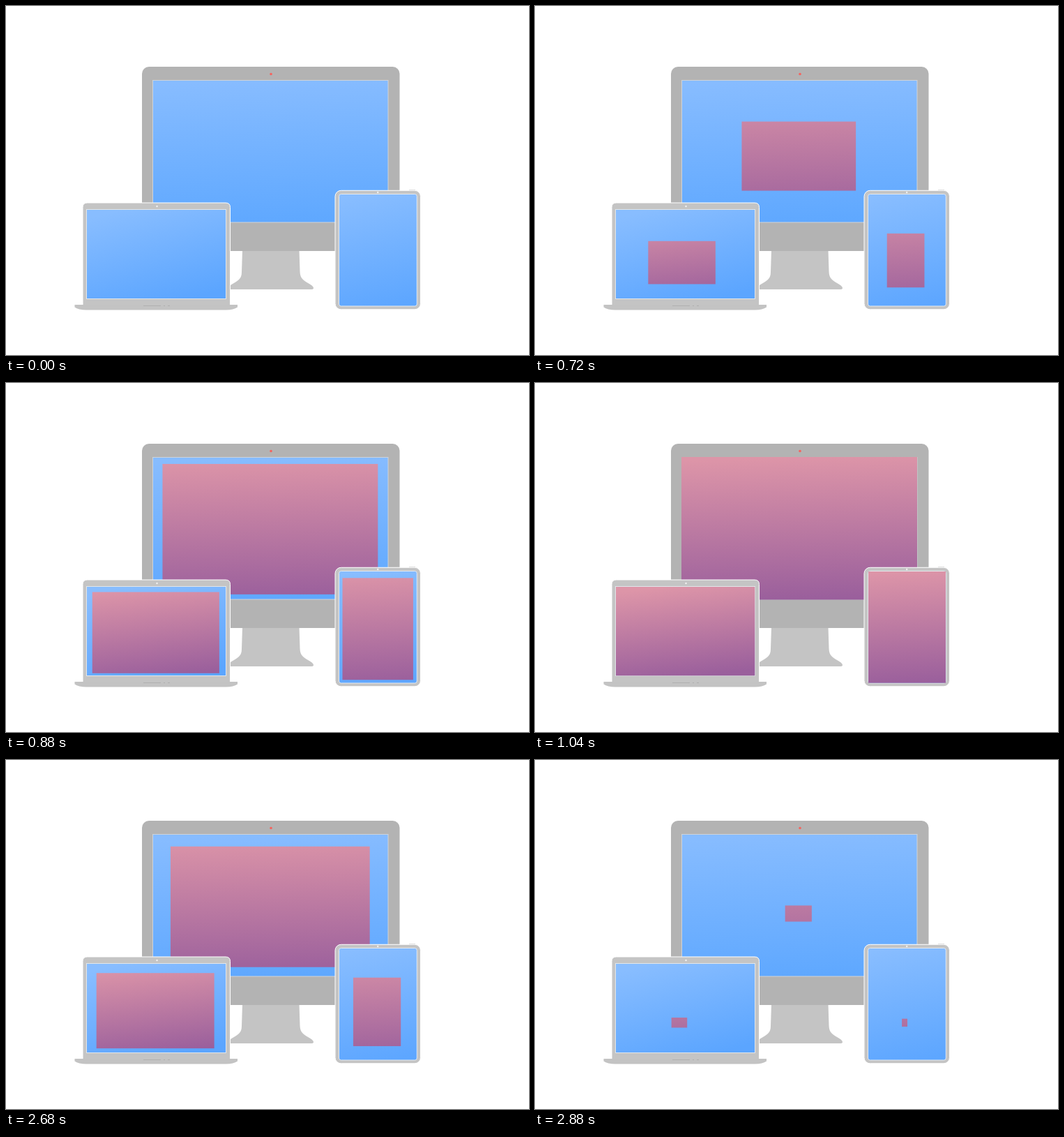
These frames come from a looping animation (750x500 px, 2920 ms). An HTML page:

```html
<!DOCTYPE html>
<html lang="en">
<head>
<meta charset="utf-8">
<title>Devices</title>
<style>
  html, body { margin: 0; width: 100%; height: 100%; overflow: hidden; background: #fff; }
  svg { display: block; width: 100vw; height: 100vh; }
</style>
</head>
<body>
<svg viewBox="0 0 750 500">
  <defs>
    <linearGradient id="skyMonitor" gradientUnits="userSpaceOnUse" x1="375" y1="106" x2="383" y2="310">
      <stop offset="0" stop-color="#87bcff"/><stop offset="1" stop-color="#5fa8ff"/>
    </linearGradient>
    <linearGradient id="skyLaptop" gradientUnits="userSpaceOnUse" x1="197" y1="284" x2="234" y2="427">
      <stop offset="0" stop-color="#88bdff"/><stop offset="1" stop-color="#5ba5ff"/>
    </linearGradient>
    <linearGradient id="skyTablet" gradientUnits="userSpaceOnUse" x1="516" y1="268" x2="551" y2="432">
      <stop offset="0" stop-color="#88bdff"/><stop offset="1" stop-color="#5da6ff"/>
    </linearGradient>
    <linearGradient id="duskMonitor" gradientUnits="userSpaceOnUse" x1="376" y1="106" x2="382" y2="310">
      <stop offset="0" stop-color="#dd95a8"/><stop offset="1" stop-color="#9a5f9c"/>
    </linearGradient>
    <linearGradient id="duskLaptop" gradientUnits="userSpaceOnUse" x1="208" y1="290" x2="223" y2="421">
      <stop offset="0" stop-color="#dd95a8"/><stop offset="1" stop-color="#9a5f9c"/>
    </linearGradient>
    <linearGradient id="duskTablet" gradientUnits="userSpaceOnUse" x1="529" y1="269" x2="538" y2="431">
      <stop offset="0" stop-color="#dd95a8"/><stop offset="1" stop-color="#9a5f9c"/>
    </linearGradient>
  </defs>

  <g id="monitor">
    <path fill="#c4c4c4" d="M339 350H420.5L421.5 381C422 391 427 393 434 397.5C439 400.5 441 402 441 404.5Q440.5 406 438 406H322Q319 406 319 404.5C319 402 321 400.5 326 397.5C333 393 338 391 338 381Z"/>
    <rect x="195" y="87" width="369.5" height="264" rx="10" fill="#b3b3b3"/>
    <circle cx="380" cy="97.5" r="1.8" fill="#f4645f"/>
    <rect x="210.5" y="106.5" width="337.5" height="203.5" fill="url(#skyMonitor)" stroke="#cfd3d8"/>
    <rect class="panel" fill="url(#duskMonitor)"/>
  </g>

  <g id="laptop">
    <path fill="#c4c4c4" stroke="#fff" stroke-width="1" d="M110 429V288.500Q110 282 116.500 282H315Q321.500 282 321.500 288.500V429Z"/>
    <path fill="#c3c3c3" d="M98.500 428H332V431.500Q326 435.500 316 435.500H115Q104 435.500 98.500 431.500Z"/>
    <path fill="none" stroke="#b0b0b0" d="M197 429.500H222M226 429.500H228M232 429.500H235"/>
    <circle cx="216.500" cy="287" r="1.200" fill="#f4f4f4"/>
    <rect x="115.500" y="291.500" width="200" height="128" fill="url(#skyLaptop)" stroke="#e2e6ea"/>
    <rect class="panel" fill="url(#duskLaptop)"/>
  </g>

  <g id="tablet">
    <path fill="none" stroke="#c4c4c4" d="M578 263.800H587"/>
    <rect x="472" y="264.300" width="122.500" height="170.500" rx="8.500" fill="#c4c4c4" stroke="#fff" stroke-width="1"/>
    <circle cx="533.200" cy="267" r="1.200" fill="#f4f4f4"/>
    <rect x="477.500" y="269.500" width="111.800" height="160.500" rx="3" fill="url(#skyTablet)" stroke="#e6eaee"/>
    <rect class="panel" fill="url(#duskTablet)"/>
  </g>
</svg>
<script>
  const LOOP = 2920, OPEN_AT = 400, CLOSE_AT = 2520;
  const clamp = v => Math.min(1, Math.max(0, v));

  // Cubic Bezier timing with control points (a, 0) and (b, 1).
  function ease(u, a, b) {
    u = clamp(u);
    let lo = 0, hi = 1;
    for (let i = 0; i < 24; i++) {
      const p = (lo + hi) / 2, q = 1 - p;
      const x = 3 * a * p * q * q + 3 * b * p * p * q + p * p * p;
      if (x < u) lo = p; else hi = p;
    }
    return lo * lo * (3 - 2 * lo);
  }

  // box: full panel; seed: the point it grows from; peak: size as closing begins.
  const panels = [
    { id: "monitor", box: [210, 106, 338, 204.5], seed: [377.6, 221.5], peak: 0.995,
      close: { start: 2518, length: 509, a: 0.6, b: 0.4 } },
    { id: "laptop", box: [116, 292, 199.3, 127.3], seed: [205.8, 378.9], peak: 0.998,
      close: { start: 2518, length: 509, a: 0.6, b: 0.4 } },
    { id: "tablet", box: [478, 270, 111, 159.7], seed: [529.8, 378.4], peak: 0.993,
      close: { start: 2500, length: 470, a: 0.3, b: 0.6 } }
  ];
  for (const p of panels) p.node = document.querySelector(`#${p.id} .panel`);

  function scaleAt(t, { peak, close }) {
    if (t < OPEN_AT) return 0;
    if (t < 1040) return Math.max(0.008, ease((t - 405) / 640, 0.6, 0.4));
    if (t < CLOSE_AT) return 1;
    return peak * (1 - ease((t - close.start) / close.length, close.a, close.b));
  }

  function draw(t) {
    for (const p of panels) {
      const s = scaleAt(t, p);
      const [x, y, w, h] = p.box, [sx, sy] = p.seed;
      const cx = sx + (x + w / 2 - sx) * s, cy = sy + (y + h / 2 - sy) * s;
      const place = { x: cx - w * s / 2, y: cy - h * s / 2, width: w * s, height: h * s };
      for (const key in place) p.node.setAttribute(key, place[key].toFixed(3));
    }
  }

  const begin = performance.now();
  function tick() {
    draw((performance.now() - begin) % LOOP);
    requestAnimationFrame(tick);
  }
  draw(0);
  requestAnimationFrame(tick);
</script>
</body>
</html>
```
